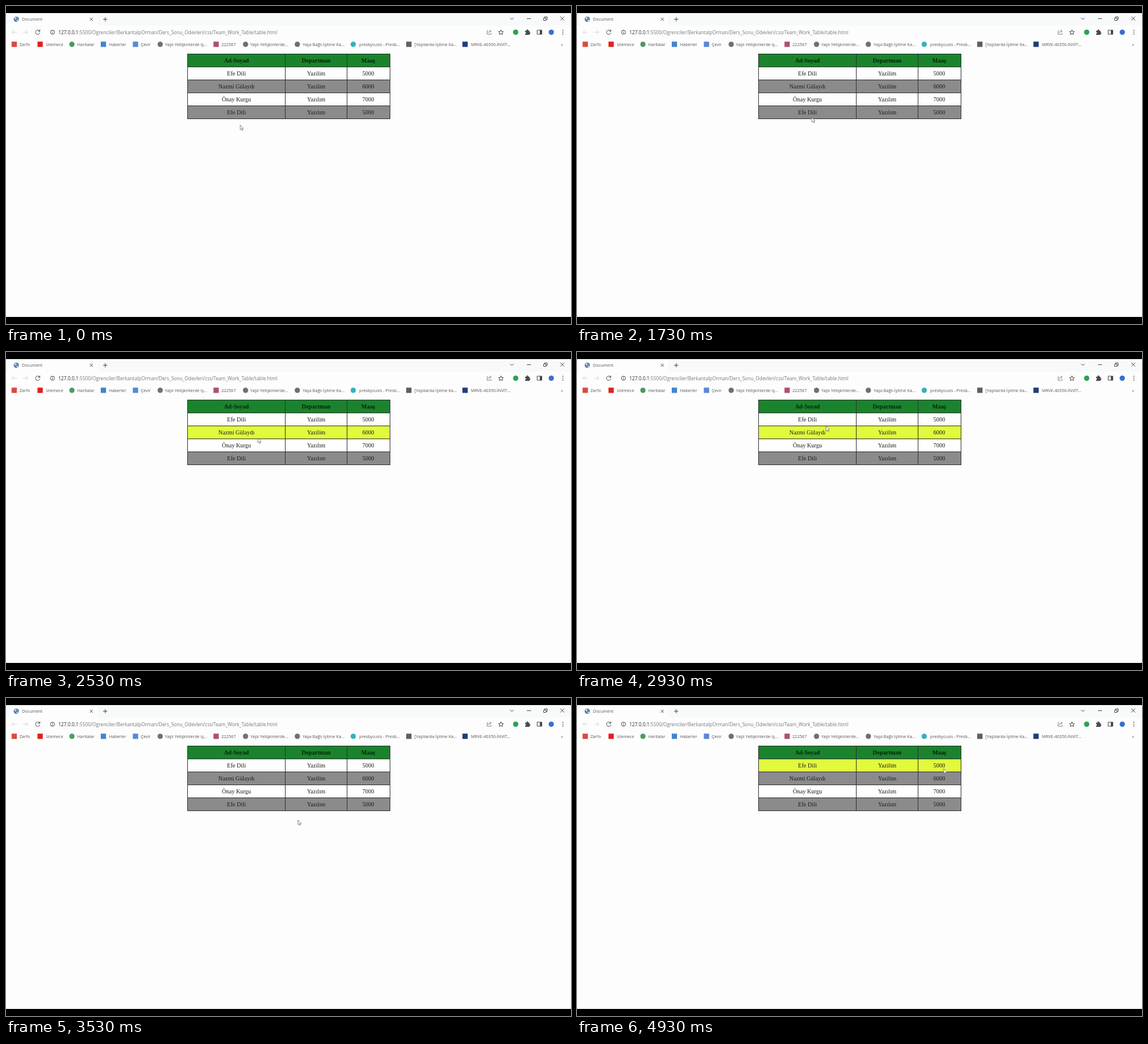
Recreate the animation shown at these times as an HTML page. Size 960 by 540 pixels, loop 4990 ms.

```html
<!DOCTYPE html>
<html lang="tr">
<head>
<meta charset="utf-8">
<title>Document</title>
<style>
  html, body { margin: 0; width: 100%; height: 100%; overflow: hidden; background: #000; }
  svg { display: block; width: 960px; height: 540px; }
  .ui { font: 7.15px "Open Sans", sans-serif; fill: #565658; }
  .url { font-size: 8.08px; fill: #77797c; }
  .url tspan { fill: #2a2a2c; }
  .cell { font: 10px "Liberation Serif", serif; fill: #1c1c1c; text-anchor: middle; }
  .head { font-weight: bold; fill: #062408; }
  .line { fill: none; stroke: #4a4a4c; stroke-width: 1; }
  .pale { stroke: #d6d6d8; }
  .grid { fill: none; stroke: #303034; stroke-width: 1; }
</style>
</head>
<body>
<svg viewBox="0 0 960 540">
  <rect y="12" width="960" height="516" fill="#fdfdfd"/>
  <rect y="12" width="960" height="21" fill="#f7f9fa"/>
  <path d="M1 33q4 0 4-4V17q0-4 4-4H151q4 0 4 4V29q0 4 4 4z" fill="#fdfdfd"/>

  <!-- tab and window buttons -->
  <circle cx="17.500" cy="22.500" r="4.500" fill="#5d7fae"/>
  <path d="M14 20l3-1 1 2-2 2zM18 24l3-1-1 3-2 0z" fill="#d5e0ec"/>
  <text class="ui" x="27" y="25">Document</text>
  <path class="line" d="M142.500 20l5 5m0-5l-5 5M165 22.500h7m-3.500-3.500v7"/>
  <path class="line" d="M856.500 20l3 3 3-3M885 21.500h7M913.500 20.500h4v4h-4zM915 20v-1.500h4.500v4.500h-2M942 18l6.500 6.500m0-6.500l-6.500 6.500"/>

  <!-- toolbar -->
  <path class="line pale" d="M18 44.500h-8m3.500-3.500l-3.500 3.500 3.500 3.500M29 44.500h8m-3.500-3.500l3.500 3.500-3.500 3.500"/>
  <path class="line" d="M57 42.500a3.700 3.700 0 1 0 .5 3M57.500 40v3h-3"/>
  <circle class="line" cx="79" cy="44.500" r="3.500"/>
  <path class="line" d="M79 44v2.500m0-4.500v1"/>
  <text class="ui url" x="89" y="47.500"><tspan>127.0.0.1</tspan>:5500/Ogrenciler/BerkantalpOrman/Ders_Sonu_Odevleri/css/Team_Work_Table/table.html</text>
  <path class="line" style="stroke: #88888a" d="M819 42h-1.500v6h7v-2M819.500 46q0-3.500 4-3.500m-1.500-2l2.500 2-2.500 2.500"/>
  <path class="line" d="M841 40.500l1.200 2.800 3 .2-2.300 2 .8 2.900-2.700-1.600-2.700 1.600.8-2.900-2.300-2 3-.2z"/>
  <circle cx="866" cy="44.500" r="4.500" fill="#28a352"/>
  <path d="M882 42h2.500a1.600 1.600 0 1 1 3 0h2v2.500a1.500 1.500 0 1 1 0 3V49H882v-2a1.500 1.500 0 0 0 0-3z" fill="#4a4a4c"/>
  <path class="line" d="M902.500 41h8v7h-8z"/>
  <path d="M907 41h4v7h-4z" fill="#4a4a4c"/>
  <circle cx="926.500" cy="44.500" r="4.500" fill="#3b6fd0"/>
  <path d="M945.500 40.500h1.500v1.500h-1.500zm0 3.200h1.500v1.500h-1.500zm0 3.200h1.500v1.500h-1.500z" fill="#4a4a4c"/>

  <g id="bookmarks"></g>
  <text class="ui" x="943" y="67.500">»</text>
  <g id="table"></g>
  <path id="cursor" d="M0 0v8.200l1.900-1.700 1.300 2.900 1.300-.6-1.300-2.700h2.400z" fill="#fff" stroke="#58585a" stroke-width=".7"/>
</svg>
<script>
const LOOP = 4990, TICK = 1000 / 15;
const $ = id => document.getElementById(id);

function add(parent, tag, attrs, text = "") {
  const node = document.createElementNS("http://www.w3.org/2000/svg", tag);
  for (const key in attrs) node.setAttribute(key, attrs[key]);
  node.textContent = text;
  parent.append(node);
  return node;
}

// label x, label, icon centre x, icon colour, round icon
const bookmarks = [
  [23, "Zarfo", 14, "#d94a40"],
  [68, "İzlemece", 58, "#e0201c"],
  [121, "Haritalar", 112, "#4c9a62", true],
  [175, "Haberler", 165.5, "#4384d0"],
  [229, "Çevir", 220, "#5688d8"],
  [270, "Yaşlı Yetişkinlerde iş...", 262, "#707072", true],
  [366, "222567", 357, "#b0506a"],
  [415, "Yaşlı Yetişkinlerde...", 407, "#707072", true],
  [504, "Yaşa Bağlı İşitme Ka...", 495, "#707072", true],
  [600, "presbycusis - Presb...", 590, "#34b0bc", true],
  [694, "[Yaşlılarda İşitme Ka...", 684.5, "#5c6064"],
  [790, "MRVE-40350-İNVİT...", 780, "#1f3c78"]
];
for (const [x, label, cx, fill, round] of bookmarks) {
  add($("bookmarks"), "rect", { x: cx - 4.5, y: 60.5, width: 9, height: 9, rx: round ? 4.5 : 0, fill });
  add($("bookmarks"), "text", { class: "ui", x, y: 67.5 }, label);
}

const TOP = 82, ROW = 22, LEFT = 308.5, WIDTH = 344;
const columns = [391.5, 527, 615.5];
const people = [
  ["Ad-Soyad", "Departman", "Maaş"],
  ["Efe Dili", "Yazilim", "5000"],
  ["Nazmi Gülaydı", "Yazilim", "6000"],
  ["Önay Kurgu", "Yazılım", "7000"],
  ["Efe Dili", "Yazılım", "5000"]
];
const colours = ["#1a832c", "#fefefe", "#8b8b8b", "#fefefe", "#8b8b8b"];
const rows = people.map((cells, i) => {
  const y = TOP + i * ROW;
  const rect = add($("table"), "rect", { x: LEFT, y, width: WIDTH, height: ROW });
  cells.forEach((cell, c) =>
    add($("table"), "text", { class: i ? "cell" : "cell head", x: columns[c], y: y + 14.4 }, cell));
  return rect;
});
for (let i = 0; i <= rows.length; i++)
  add($("table"), "path", { class: "grid", d: `M${LEFT} ${TOP - .5 + i * ROW}h${WIDTH}` });
add($("table"), "path", { class: "grid", d: "M308.500 81v111M474.500 81v111M579.500 81v111M652.500 81v111" });

// pointer path: tick, x, y
const path = [
  [0, 398, 202], [14, 398, 202], [15, 399, 202], [19, 425, 170], [23, 401, 204], [26, 399, 189],
  [31, 425, 125], [32, 428, 122], [34, 431, 95], [38, 428, 146], [44, 423, 126], [48, 436, 81],
  [52, 490, 202], [53, 496, 207], [56, 502, 211], [64, 612, 80], [74, 623, 120]
];
const stalls = [[4, 15], [19, 22], [23, 26], [38, 41], [64, 67]];

function pointer(tick) {
  const i = Math.max(1, path.findIndex(p => p[0] >= tick));
  const [t0, x0, y0] = path[i - 1], [t1, x1, y1] = path[i];
  const k = Math.max(0, (tick - t0) / (t1 - t0));
  return [x0 + (x1 - x0) * k, y0 + (y1 - y0) * k].map(Math.round);
}

function draw(now) {
  let tick = Math.floor((now % LOOP + 4) / TICK);
  const stall = stalls.find(([from, to]) => tick >= from && tick < to);
  if (stall) tick = stall[0];
  // the hover colour follows the pointer one tick late
  const hover = Math.floor((pointer(tick - 1)[1] - TOP) / ROW);
  $("cursor").setAttribute("transform", `translate(${pointer(tick)})`);
  rows.forEach((row, i) => row.setAttribute("fill", i && i === hover ? "#e2fa3c" : colours[i]));
  requestAnimationFrame(draw);
}
draw(0);
</script>
</body>
</html>
```
